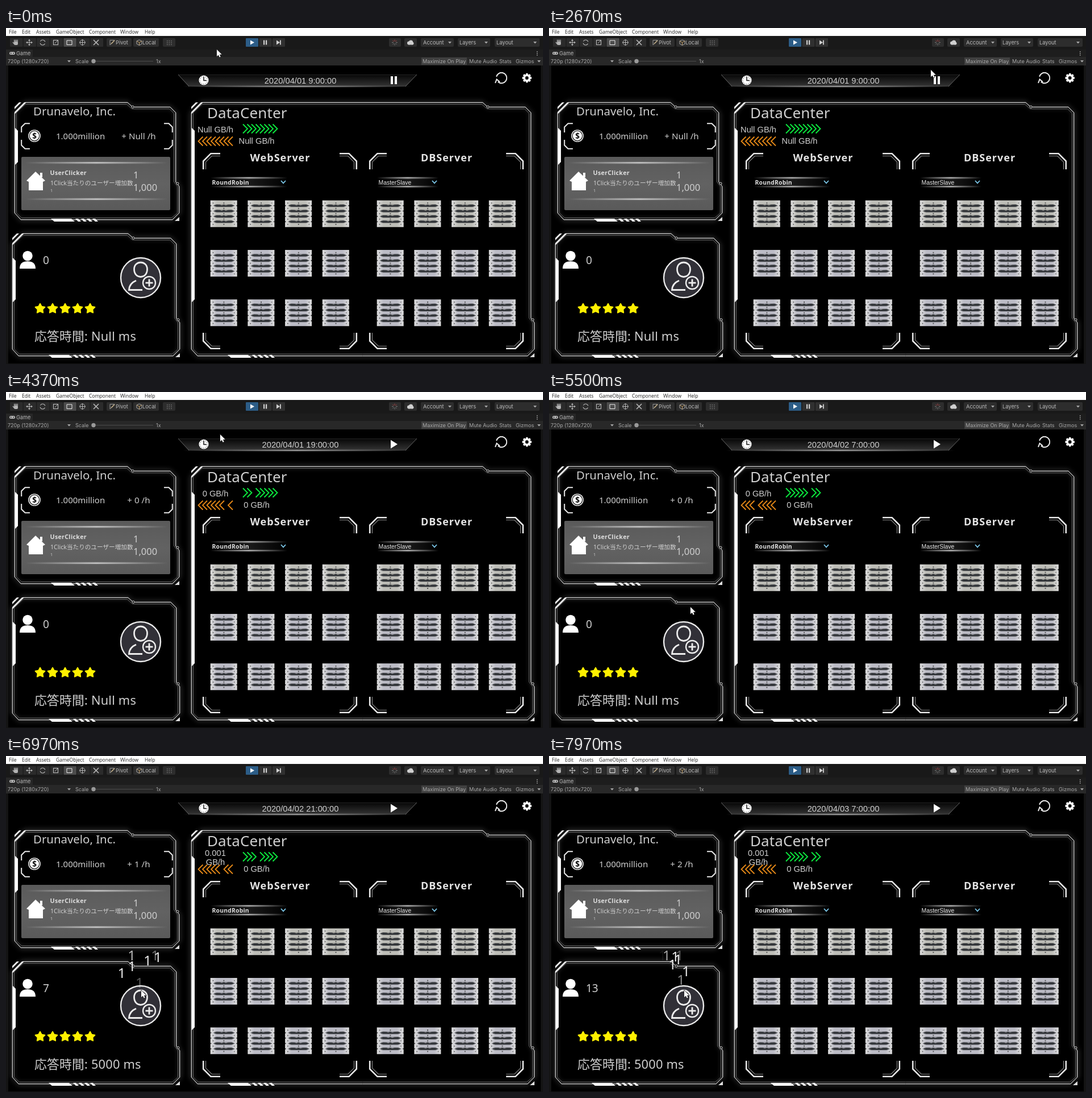
An HTML page with a canvas for the animation above (8000 ms loop, 945x592 px).

```html
<!DOCTYPE html>
<html lang="ja">
<head>
<meta charset="utf-8">
<title>Data center game</title>
<style>
html, body { margin: 0; width: 100%; height: 100%; overflow: hidden; background: #000; }
canvas { display: block; }
</style>
</head>
<body>
<canvas id="stage" width="945" height="592"></canvas>
<script>
const W = 945, H = 592, LOOP = 8000;
const view = document.getElementById('stage').getContext('2d');
const backdrop = document.createElement('canvas');
backdrop.width = W;
backdrop.height = H;
let c = backdrop.getContext('2d');

const UI = '"Noto Sans", "Noto Sans CJK JP", sans-serif';
const ARIAL = '"Liberation Sans", Arial, sans-serif';
const MENU = '"Open Sans", sans-serif';
const EDITOR = 'Inter, sans-serif';

function text(s, x, y, size, { font = UI, color = '#cfcfcf', align = 'left', weight = 400, gap = 0 } = {}) {
  c.font = `${weight} ${size}px ${font}`;
  c.letterSpacing = gap + 'px';
  c.textAlign = align;
  c.fillStyle = color;
  c.fillText(s, x, y);
}
function rect(x, y, w, h, color, r = 0) {
  c.fillStyle = color;
  c.beginPath();
  c.roundRect(x, y, w, h, r);
  c.fill();
}
function trace(points, close) {
  c.beginPath();
  points.forEach(([x, y], i) => i ? c.lineTo(x, y) : c.moveTo(x, y));
  if (close) c.closePath();
}
function line(points, color, width = 1, close = false) {
  trace(points, close);
  c.strokeStyle = color;
  c.lineWidth = width;
  c.stroke();
}
function poly(points, color) {
  trace(points, true);
  c.fillStyle = color;
  c.fill();
}
function disc(x, y, r, color) {
  c.beginPath();
  c.arc(x, y, r, 0, Math.PI * 2);
  c.fillStyle = color;
  c.fill();
}
function ring(x, y, r, color, width = 1, from = 0, to = Math.PI * 2) {
  c.beginPath();
  c.arc(x, y, r, from, to);
  c.strokeStyle = color;
  c.lineWidth = width;
  c.stroke();
}
function glow(blur, draw) {
  c.save();
  c.shadowColor = '#fff';
  c.shadowBlur = blur;
  draw();
  c.restore();
}
function fade(x0, x1, alpha) {
  const g = c.createLinearGradient(x0, 0, x1, 0);
  g.addColorStop(0, 'rgba(255,255,255,0)');
  g.addColorStop(0.5, `rgba(255,255,255,${alpha})`);
  g.addColorStop(1, 'rgba(255,255,255,0)');
  return g;
}
function fadeLine(x0, x1, y, alpha = 0.85) {
  rect(x0, y - 2, x1 - x0, 5, fade(x0, x1, alpha * 0.18));
  rect(x0, y - 0.3, x1 - x0, 1.5, fade(x0, x1, alpha));
}

// Editor chrome
function dropArrow(x, y) {
  poly([[x - 3, y - 1.5], [x + 3, y - 1.5], [x, y + 2]], '#a8a8a8');
}
function chrome() {
  rect(0, 0, W, 14, '#fff');
  [['File', 5], ['Edit', 28], ['Assets', 53], ['GameObject', 88], ['Component', 146], ['Window', 201], ['Help', 244]]
    .forEach(([s, x]) => text(s, x, 10, 8.5, { font: MENU, color: '#222' }));

  rect(0, 14, W, 24, '#191919');
  for (let i = 0; i < 7; i++) rect(7 + i * 23.6, 18, 22.5, 15, i === 4 ? '#4c4c4c' : '#2b2b2b', 1);
  tools('#b4b4b4');
  [[177, 44], [224, 45], [276, 22], [674, 21], [701, 22], [730, 58], [795, 57], [860, 79]]
    .forEach(([x, w]) => rect(x, 18, w, 15, '#2d2d2d', 2));
  const small = { font: EDITOR, color: '#bababa' };
  line([[183, 21.5], [191, 21.5], [183, 30], [183, 21.5]], '#999');
  line([[185, 28], [191, 22]], '#c9b48c', 1.4);
  text('Pivot', 193, 29, 9.3, small);
  line([[230, 23], [234.5, 21], [239, 23], [239, 28], [234.5, 30.5], [230, 28]], '#aaa', 1, true);
  line([[230, 23], [234.5, 25.5], [239, 23]], '#c9a46c');
  line([[234.5, 25.5], [234.5, 30]], '#c9a46c');
  text('Local', 240, 29, 9.3, small);
  for (let i = 0; i < 9; i++) rect(283 + i % 3 * 3.6, 22 + (i / 3 | 0) * 3.3, 1.5, 1.5, '#777');

  rect(422, 18, 22, 15, '#2c5d87', 1);
  rect(445.5, 18, 22, 15, '#303030', 1);
  rect(469, 18, 22, 15, '#303030', 1);
  poly([[430, 21.5], [437, 25.5], [430, 29.5]], '#fff');
  rect(453, 21.5, 2.2, 8, '#d0d0d0');
  rect(457, 21.5, 2.2, 8, '#d0d0d0');
  poly([[476, 21.5], [482, 25.5], [476, 29.5]], '#d0d0d0');
  rect(482, 21.5, 1.8, 8, '#d0d0d0');

  for (let a = 0; a < 8; a++) {
    const dx = Math.cos(a * Math.PI / 4), dy = Math.sin(a * Math.PI / 4);
    line([[684 + dx * 2, 25.5 + dy * 2], [684 + dx * 5, 25.5 + dy * 5]], a > 4 ? '#a44' : '#777');
  }
  disc(709, 26.5, 3, '#d0d0d0');
  disc(712.5, 25, 3.6, '#d0d0d0');
  disc(715, 27, 2.5, '#d0d0d0');
  rect(708, 26, 8, 3.5, '#d0d0d0', 1);
  text('Account', 734, 29, 9.3, small);
  text('Layers', 798, 29, 9.3, small);
  text('Layout', 863, 29, 9.3, small);
  [781, 845, 931].forEach(x => dropArrow(x, 25.5));

  rect(0, 38, W, 13, '#1d1d1d');
  rect(0, 38, 47, 13, '#272727');
  rect(6, 42, 10, 5, '#b8b8b8', 2.5);
  disc(8.7, 44.5, 1, '#272727');
  disc(13.2, 44.5, 1, '#272727');
  text('Game', 18, 48, 9.2, small);
  [41, 44, 47].forEach(y => rect(934, y, 1.4, 1.4, '#bbb'));

  rect(0, 51, W, 15, '#282828');
  rect(731, 52, 80, 13, '#404040');
  const bar = { font: EDITOR, color: '#a8a8a8' };
  text('720p (1280x720)', 3, 62, 9, bar);
  dropArrow(111, 58.5);
  text('Scale', 122, 62, 9, bar);
  line([[154, 58.5], [259, 58.5]], '#4c4c4c');
  disc(154, 58.5, 3.7, '#9a9a9a');
  text('1x', 264, 62, 9, bar);
  text('Maximize On Play', 733, 62, 9.1, bar);
  text('Mute Audio', 815, 62, 9.1, bar);
  text('Stats', 868, 62, 9.1, bar);
  text('Gizmos', 897, 62, 9.1, bar);
  dropArrow(938, 58.5);
}
function tools(k) {
  rect(14, 24, 7, 6, k, 2);
  for (let i = 0; i < 4; i++) rect(14 + i * 1.9, 20.5, 1.2, 5, k, 0.6);
  line([[12, 25], [15, 28.5]], k, 1.5);
  line([[36, 25.5], [46, 25.5]], k);
  line([[41, 20.5], [41, 30.5]], k);
  [[-1, 0], [1, 0], [0, -1], [0, 1]].forEach(([u, v]) => poly(
    [[41 + u * 6, 25.5 + v * 6], [41 + u * 3 + v * 2, 25.5 + v * 3 + u * 2], [41 + u * 3 - v * 2, 25.5 + v * 3 - u * 2]], k));
  ring(64.5, 25.5, 4.5, k, 1.2, 0.5, 2.9);
  ring(64.5, 25.5, 4.5, k, 1.2, 3.6, 6);
  c.strokeRect(83.5, 21.5, 8, 8);
  line([[86, 27], [91, 22]], k);
  line([[107, 22], [116, 22], [116, 29.5], [107, 29.5]], '#eee', 1, true);
  ring(134.5, 25.5, 4.5, k);
  line([[129, 25.5], [140, 25.5]], k);
  line([[134.5, 20], [134.5, 31]], k);
  line([[154, 21], [163, 30]], k, 1.7);
  line([[163, 21], [154, 30]], k, 1.7);
}

// Game frames
function panel(x, y, X, Y, barTop, barEnd) {
  const edge = d => [
    [x + d, y + 18], [x + 18 + d * 0.3, y + d], [X - 91 - d * 0.4, y + d], [X - 82 - d * 0.4, y + 8 + d],
    [X - 16 - d * 0.4, y + 8 + d], [X - 6 - d, y + 18 + d * 0.4], [X - 6 - d, Y - 69], [X - d, Y - 61],
    [X - d, Y - 14], [X - 12 - d * 0.4, Y - 2 - d], [x + 11 + d * 0.4, Y - 2 - d], [x + d, Y - 14]
  ];
  glow(8, () => line(edge(0), '#8c8c8c', 1, true));
  line(edge(0.5), '#c8c8c8', 1, true);
  line(edge(3.5), '#6a6a6a', 0.9, true);
  poly([[x, y + 8], [x + 8, y], [x + 12, y], [x, y + 12]], '#eee');
  poly([[x, y + 17], [x + 17, y], [x + 21, y], [x, y + 21]], '#eee');
  poly([[x + 1, barTop], [x + 6, barTop + 5], [x + 6, barEnd - 5], [x + 1, barEnd]], '#fff');
  const b = x + 64;
  poly([[b, Y - 4], [b + 36, Y - 4], [b + 42, Y + 1], [b + 6, Y + 1]], '#fff');
  for (let i = 0; i < 4; i++) {
    const s = b + 43 + i * 10;
    poly([[s, Y - 4], [s + 5, Y - 4], [s + 10, Y + 1], [s + 5, Y + 1]], '#fff');
  }
  poly([[X - 8, Y], [X, Y - 7], [X, Y]], '#ddd');
  [[X - 82, y + 8], [X - 3, Y - 66]].forEach(([u, v]) => {
    disc(u, v, 2.4, '#000');
    ring(u, v, 2, '#ddd');
  });
}
function brackets(x, y, X, Y, cut, arm, rise, width, inset) {
  [[x, y, 1, 1], [X, y, -1, 1], [x, Y, 1, -1], [X, Y, -1, -1]].forEach(([u, v, sx, sy]) => {
    const path = d => [[u + sx * d, v + sy * rise], [u + sx * d, v + sy * (cut + d * 0.4)],
      [u + sx * (cut + d * 0.4), v + sy * d], [u + sx * arm, v + sy * d]];
    line(path(1.2), '#e8e8e8', width);
    if (inset) line(path(inset), '#888', 1.2);
  });
}
function server(x, y, tone) {
  const g = c.createLinearGradient(x, 0, x + 47, 0);
  g.addColorStop(0, '#dcdcdc');
  g.addColorStop(0.25, tone);
  g.addColorStop(0.75, tone);
  g.addColorStop(1, '#dcdcdc');
  rect(x, y, 47, 47, g);
  for (let i = 0; i < 5; i++) {
    const m = y + 4.7 + i * 9.4;
    rect(x + 4, m - 0.7, 1.5, 1.5, '#444');
    rect(x + 41.5, m - 0.7, 1.5, 1.5, '#666');
    rect(x + 22.8, m - 0.9, 1.8, 1.8, '#444');
    if (i === 4) continue;
    const s = m + 4.7;
    rect(x + 7, s - 2.8, 33, 5.6, 'rgba(60,60,60,.25)', 2);
    poly([[x + 5, s], [x + 11, s - 2], [x + 17, s - 1.8], [x + 20, s - 0.6], [x + 23.5, s - 2.2], [x + 27, s - 0.6],
      [x + 31, s - 1.8], [x + 37, s - 2], [x + 43, s], [x + 37, s + 2], [x + 11, s + 2]], '#33363a');
    poly([[x, s - 1.3], [x + 2, s], [x, s + 1.3]], '#111');
    poly([[x + 47, s - 1.3], [x + 45, s], [x + 47, s + 1.3]], '#111');
  }
}
function rack(x, title, mode, style, end) {
  brackets(x, 220, x + 272, 566, 14, 31, 29, 2.6, 5.5);
  text(title, x + 136.5, 235, 18, { weight: 600, gap: 1, align: 'center', color: '#e4e4e4' });
  rect(x + 14, 264, end - x - 7, 15, fade(x + 14, end + 7, 0.1));
  fadeLine(x + 14, end + 7, 263.5);
  fadeLine(x + 14, end + 7, 279);
  text(mode, x + 16.5, 276, 10.4, style);
  line([[end - 4, 269], [end, 273.5], [end + 4, 269]], '#7fcdf0', 1.8);
  for (let r = 0; r < 3; r++)
    for (let i = 0; i < 4; i++) server(x + 13.7 + i * 65.7, 303.7 + r * 87.3, r ? '#bcbcc6' : '#bebeb8');
}

function banner() {
  const g = c.createLinearGradient(0, 82, 0, 103);
  g.addColorStop(0, '#060606');
  g.addColorStop(1, '#343434');
  poly([[303, 82], [723, 82], [703, 103], [322, 103]], g);
  line([[303, 82.5], [723, 82.5]], '#242424');
  line([[303, 82], [322, 103]], '#666');
  line([[723, 82], [703, 103]], '#666');
  fadeLine(310, 715, 102.5, 0.65);
  disc(348, 92, 8.6, '#fff');
  line([[348, 86], [348, 92.5], [353, 92.5]], '#111', 1.5);
  for (let i = 0; i < 12; i++)
    disc(348 + 6.7 * Math.cos(i * Math.PI / 6), 92 + 6.7 * Math.sin(i * Math.PI / 6), 0.6, '#333');

  ring(872, 88, 9.2, '#eee', 2, -2.9, 2.3);
  line([[861, 97], [863.5, 90.5], [869, 95]], '#eee', 2);
  for (let i = 0; i < 8; i++) {
    c.save();
    c.translate(916.7, 88);
    c.rotate(i * Math.PI / 4);
    rect(-1.9, -8.2, 3.8, 4, '#fff', 1);
    c.restore();
  }
  ring(916.7, 88, 4.6, '#fff', 3.4);
}

function company() {
  panel(15, 131, 305, 340, 176, 241);
  text('Drunavelo, Inc.', 48, 154, 20.4);
  brackets(26, 167, 294, 214, 7, 16, 17, 2);
  disc(50, 190, 10.8, '#fff');
  ring(50, 190, 8.8, '#111', 1.2);
  text('$', 50, 195, 13.5, { align: 'center', weight: 700, color: '#111' });
  text('1.000million', 88, 196, 15);

  const g = c.createLinearGradient(0, 227, 0, 321);
  g.addColorStop(0, '#5a5a5a');
  g.addColorStop(0.5, '#626262');
  g.addColorStop(1, '#5a5a5a');
  rect(27, 227, 262, 94, g, 2);
  fadeLine(34, 284, 237);
  fadeLine(34, 284, 301);
  poly([[52, 253], [69, 269], [65, 271], [65, 286], [40, 286], [40, 271], [36, 269]], '#fff');
  rect(60, 255, 4, 8, '#fff');
  text('UserClicker', 77.5, 259, 10.7, { weight: 600, gap: 0.3, color: '#dedede' });
  text('1Click当たりのユーザー増加数', 78, 277, 10.6);
  text('1', 78, 289, 7);
  text('1', 224, 265, 16.5);
  text('1,000', 224, 286.5, 16.5);
}

function users() {
  panel(11, 362, 306, 580, 405, 483);
  disc(38, 401.5, 8.7, '#fff');
  c.beginPath();
  c.moveTo(24, 424);
  c.bezierCurveTo(24, 414, 30, 411, 38, 411);
  c.bezierCurveTo(46, 411, 52, 414, 52, 424);
  c.fill();

  disc(237, 440, 35, '#313037');
  ring(237, 440, 35, '#ececec', 2.4);
  c.lineWidth = 2.8;
  c.beginPath();
  c.moveTo(225.5, 425);
  c.bezierCurveTo(225.5, 409, 248.5, 409, 248.5, 425);
  c.bezierCurveTo(248.5, 443, 225.5, 443, 225.5, 425);
  c.stroke();
  c.beginPath();
  c.moveTo(240, 461.5);
  c.lineTo(216.5, 461.5);
  c.quadraticCurveTo(217, 450, 229, 445);
  c.stroke();
  disc(252, 449, 13.5, '#313037');
  ring(252, 449, 11, '#ececec', 2.4);
  line([[245.5, 449], [258.5, 449]], '#ececec', 2.8);
  line([[252, 442.5], [252, 455.5]], '#ececec', 2.8);
}

function buildBackdrop() {
  rect(0, 0, W, H, '#141414');
  rect(4, 66, 937, 525, '#000');
  chrome();
  banner();
  company();
  users();
  panel(326, 131, 930, 580, 176, 483);
  text('DataCenter', 354, 159, 26, { gap: 0.1 });
  rack(346, 'WebServer', 'RoundRobin', { weight: 600, gap: 0.2, color: '#e0e0e0' }, 488);
  rack(639, 'DBServer', 'MasterSlave', { font: ARIAL, color: '#e8e8e8' }, 754);
}

// Moving parts
const HOUR = 100, CLOCK_START = 3285, SWEEP_START = 3345, SWEEP = 101;
const PLAY = 3150, CLICK_START = 5650, CLICK = 190;
const popX = [262, 221, 251, 265, 234, 194, 240, 248, 248, 216, 241, 232, 262];
const popDrift = [0, 0, 17, -21, -22, 26, -28, -26, -26, 2, 0, 0, 0];
const track = [
  [0, 371, 38], [30, 371, 38], [400, 520, 58], [830, 800, 72], [900, 800, 72], [1050, 950, 70],
  [1560, 950, 71], [1561, 893, 71], [1600, 875, 71], [1770, 875, 71], [1930, 800, 74], [2070, 800, 74],
  [2600, 672, 74], [3330, 672, 74], [4100, 400, 72], [4370, 377, 75], [5000, 320, 160], [5580, 238, 413], [LOOP, 238, 413]
];

function pointer(t) {
  const i = track.findIndex(k => k[0] > t);
  const [t0, x0, y0] = track[i - 1], [t1, x1, y1] = track[i];
  const f = (t - t0) / (t1 - t0);
  const x = Math.round(x0 + (x1 - x0) * f), y = Math.round(y0 + (y1 - y0) * f);
  const shape = [[0, 0], [0, 12], [2.8, 9.4], [4.7, 13.6], [6.6, 12.7], [4.8, 8.7], [8.6, 8.5]].map(([u, v]) => [x + u, y + v]);
  line(shape, '#222', 1.2, true);
  poly(shape, '#fff');
}
function chevrons(x, y, dir, color, hole) {
  for (let i = 0; i < 8; i++) {
    if (i === hole) continue;
    const u = x + dir * i * 7.5;
    line([[u, y - 8], [u + dir * 8, y], [u, y + 8]], color, 1.8);
  }
}
function stars(edge) {
  c.save();
  c.beginPath();
  c.rect(40, 480, edge - 40, 28);
  c.clip();
  c.lineJoin = 'round';
  for (let i = 0; i < 5; i++) {
    const pts = Array.from({ length: 10 }, (_, k) => {
      const a = -Math.PI / 2 + k * Math.PI / 5, r = k % 2 ? 4.6 : 8.8;
      return [60 + i * 22 + r * Math.cos(a), 494.5 + r * Math.sin(a)];
    });
    poly(pts, '#fff000');
    line(pts, '#fff000', 2, true);
  }
  c.restore();
}
function pops(t) {
  popX.forEach((x, k) => {
    const age = t - CLICK_START - k * CLICK;
    if (age < 0 || age > 1600) return;
    const left = 1 - Math.min(1, age / 1200);
    c.globalAlpha = Math.min(1, (age / 300) ** 2, (1600 - age) / 600);
    text('1', x + popDrift[k] * age / 1000, 426 - 66 * (1 - left * left), 24, { align: 'center', color: '#eee' });
  });
  c.globalAlpha = 1;
}

function draw(t) {
  c = view;
  c.drawImage(backdrop, 0, 0);
  const hours = Math.max(0, Math.floor((t - CLOCK_START) / HOUR));
  const count = Math.max(0, Math.floor((t - CLICK_START) / CLICK) + 1);
  const total = 9 + hours, mid = { font: ARIAL, align: 'center' };

  text(`2020/04/0${1 + Math.floor(total / 24)} ${total % 24}:00:00`, 518, 97.5, 14.7, mid);
  if (t < PLAY) {
    rect(677, 85, 4, 14, '#fff');
    rect(684, 85, 4, 14, '#fff');
  } else poly([[677, 84.5], [689, 92], [677, 99.5]], '#fff');

  text(`+ ${hours ? Math.round(count / 7) : 'Null'} /h`, 233.5, 196, 15.2, { align: 'center' });
  const rate = hours ? '0 GB/h' : 'Null GB/h';
  if (count) {
    text('0.001', 368.5, 175.5, 14.7, mid);
    text('GB/h', 368.5, 192, 14.7, mid);
  } else text(rate, 368.5, 184, 14.7, mid);
  text(rate, 441, 203.5, 14.7, mid);

  const step = t < SWEEP_START ? -1 : Math.floor((t - SWEEP_START) / SWEEP) % 8;
  chevrons(417, 177.5, 1, '#0cf040', step);
  chevrons(399, 199.5, -1, '#e88a18', step < 0 ? -1 : (step + 7) % 8);

  text(count, 65, 416, 19);
  text(`応答時間: ${count ? 5000 : 'Null'} ms`, 50, 551, 21.8, { gap: 0.2 });
  stars(158.5 - Math.max(0, t - 6970) * 0.004);
  pops(t);
  pointer(t);
}

buildBackdrop();
const start = performance.now();
(function frame() {
  draw((performance.now() - start) % LOOP);
  requestAnimationFrame(frame);
})();
</script>
</body>
</html>
```
